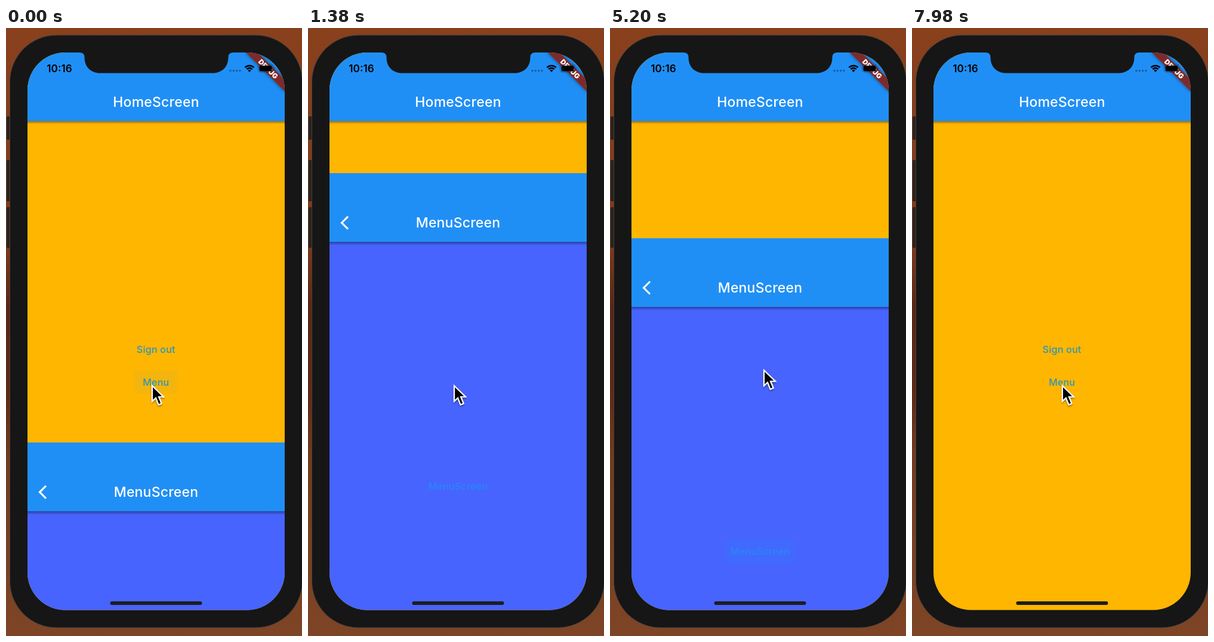
An HTML page for the animation above (8000 ms loop, 496 px wide and 1018 px high).

```html
<!DOCTYPE html>
<html lang="en">
<head>
<meta charset="utf-8">
<title>Screen transition</title>
<style>
  html, body { margin: 0; width: 100%; height: 100%; overflow: hidden; background: #7d4526; }
  svg { display: block; width: 496px; height: 1018px; }
  text { font-family: Inter, Roboto, sans-serif; text-anchor: middle; }
  .title { font-size: 23px; font-weight: 500; letter-spacing: .2px; fill: #fff; }
  .button { font-size: 16.1px; font-weight: 500; letter-spacing: .2px; }
  .time { font-size: 17.2px; font-weight: 600; }
  .debug { font-size: 11.7px; font-weight: 900; fill: #fff; }
  .bar { fill: #208ff5; }
  .bezel { fill: #161616; }
</style>
</head>
<body>
<svg viewBox="0 0 496 1018">
  <defs>
    <linearGradient id="wall" x2="0" y2="1">
      <stop offset="0" stop-color="#89401d"/>
      <stop offset=".35" stop-color="#823a1a"/>
      <stop offset=".46" stop-color="#5a2616"/>
      <stop offset=".6" stop-color="#602916"/>
      <stop offset=".7" stop-color="#743a1c"/>
      <stop offset="1" stop-color="#7d4526"/>
    </linearGradient>
    <linearGradient id="shade" x2="0" y2="1">
      <stop offset="0" stop-opacity=".38"/>
      <stop offset="1" stop-opacity="0"/>
    </linearGradient>
    <clipPath id="screen"><rect x="36" y="41" width="431" height="933.5" rx="63"/></clipPath>
    <filter id="soft" x="-50%" y="-50%" width="200%" height="200%">
      <feDropShadow dx="0" dy="2" stdDeviation="1.5" flood-opacity=".4"/>
    </filter>
    <filter id="glow" x="-20%" y="-80%" width="140%" height="260%">
      <feDropShadow dx="0" dy="0" stdDeviation="3" flood-opacity=".5"/>
    </filter>
  </defs>

  <rect width="496" height="1018" fill="url(#wall)"/>

  <g fill="#262420">
    <rect x="1" y="148" width="8" height="39" rx="1.5"/>
    <rect x="1" y="221" width="8" height="69" rx="1.5"/>
    <rect x="1" y="300" width="8" height="68" rx="1.5"/>
  </g>
  <rect class="bezel" x="6.5" y="12" width="490" height="992" rx="78" stroke="#45413c"/>

  <g clip-path="url(#screen)">
    <rect x="36" y="41" width="431" height="934" fill="#ffb600"/>
    <rect class="bar" x="36" y="41" width="431" height="115"/>
    <rect x="36" y="156" width="431" height="5" fill="url(#shade)"/>
    <text class="title" x="251.5" y="132">HomeScreen</text>
    <rect id="homePress" x="215" y="574" width="72" height="38" rx="4" fill="#208ff5"/>
    <g class="button" fill="#2b96b8">
      <text x="251.3" y="543.5">Sign out</text>
      <text x="251.3" y="598.5">Menu</text>
    </g>

    <g id="sheet">
      <rect x="36" y="41" width="431" height="934" fill="#4764ff"/>
      <rect class="bar" x="36" y="41" width="431" height="115"/>
      <rect x="36" y="156" width="431" height="6" fill="url(#shade)"/>
      <path d="M67 113.5L56.5 124L67 134.5" fill="none" stroke="#fff" stroke-width="3.1"/>
      <text class="title" x="251.5" y="132">MenuScreen</text>
      <rect id="menuPress" x="193" y="545" width="117" height="41" rx="4" fill="#208ff5"/>
      <text class="button" x="251.3" y="571" fill="#2888f5">MenuScreen</text>
    </g>

    <g transform="translate(467 41) rotate(45)">
      <rect x="-46" y="32.2" width="92" height="13.8" fill="#7e2a2c" filter="url(#glow)"/>
      <text class="debug" x="0" y="43.3">DEBUG</text>
    </g>

    <rect x="174.5" y="960" width="154" height="6" rx="3" fill="#1d1d1f"/>
  </g>

  <path class="bezel" d="M123 40V41Q131.5 41 131.5 49C131.5 65 142 75.5 158 75.5H346C362 75.5 372.5 65 372.5 49Q372.5 41 381 41V40Z"/>

  <text class="time" x="89.5" y="73.6">10:16</text>
  <g fill-opacity=".35">
    <circle cx="376" cy="71.5" r="1.7"/>
    <circle cx="381.3" cy="71.5" r="1.7"/>
    <circle cx="386.6" cy="71.5" r="1.7"/>
    <circle cx="391.9" cy="71.5" r="1.7"/>
  </g>
  <g transform="translate(408 73.7)">
    <path d="M0 0L-2.7 -2.7A3.8 3.8 0 0 1 2.7 -2.7Z"/>
    <path d="M-4.7 -4.7A6.6 6.6 0 0 1 4.7 -4.7M-7.6 -7.6A10.7 10.7 0 0 1 7.6 -7.6" fill="none" stroke="#000" stroke-width="2.5"/>
  </g>
  <rect x="422.5" y="61" width="25" height="13" rx="3.5" fill="none" stroke="#000" stroke-opacity=".35"/>
  <rect x="424.5" y="63" width="21" height="9.5" rx="2"/>
  <path d="M449 65.5Q451 67.5 449 69.5Z" fill-opacity=".4"/>

  <g id="cursor" filter="url(#soft)">
    <path d="M1 2V28L7 22.3L11.7 33.8L16.7 31.7L12 20.5H20Z" stroke="#fff" stroke-width="2.2"/>
  </g>
</svg>

<script>
const LOOP = 8000, HEIGHT = 933;
const [sheet, cursor, homePress, menuPress] =
  ['sheet', 'cursor', 'homePress', 'menuPress'].map(id => document.getElementById(id));

// [tick, x, y] of the pointer tip
const path = [
  [0, 244, 597], [48, 244, 597], [70, 256, 575], [90, 256, 575], [104, 257, 571],
  [118, 257, 571], [138, 249, 599], [142, 249, 599], [152, 251, 597], [172, 251, 597]
];

const clamp = v => Math.min(1, Math.max(0, v));

// Three ticks share each 140 ms and stay 20, 100 and 20 ms.
function tickAt(t) {
  const r = t % 140;
  return 3 * Math.floor(t / 140) + (r < 20 ? 0 : r < 120 ? 1 : 2);
}

// Opens over 60 ticks, closes over 18, both linear.
function sheetOffset(k) {
  return HEIGHT * (k < 90 ? clamp((42 - k) / 60) : clamp((k - 106) / 18));
}

function pointer(k) {
  const i = path.findIndex(p => p[0] > k);
  const [k0, x0, y0] = path[i - 1], [k1, x1, y1] = path[i];
  const u = (k - k0) / (k1 - k0), e = u * u * (3 - 2 * u);
  return [x0 + (x1 - x0) * e, y0 + (y1 - y0) * e];
}

function draw(now) {
  const k = tickAt(now % LOOP);
  const [x, y] = pointer(k), offset = sheetOffset(k);
  sheet.setAttribute('transform', `translate(0 ${offset.toFixed(2)})`);
  sheet.setAttribute('visibility', offset < HEIGHT ? 'visible' : 'hidden');
  cursor.setAttribute('transform', `translate(${x.toFixed(1)} ${y.toFixed(1)})`);
  homePress.setAttribute('opacity', 0.05 * clamp(1 - k / 8));
  menuPress.setAttribute('opacity', 0.12 * clamp((k - 98) / 6));
  requestAnimationFrame(draw);
}
draw(performance.now());
</script>
</body>
</html>
```
